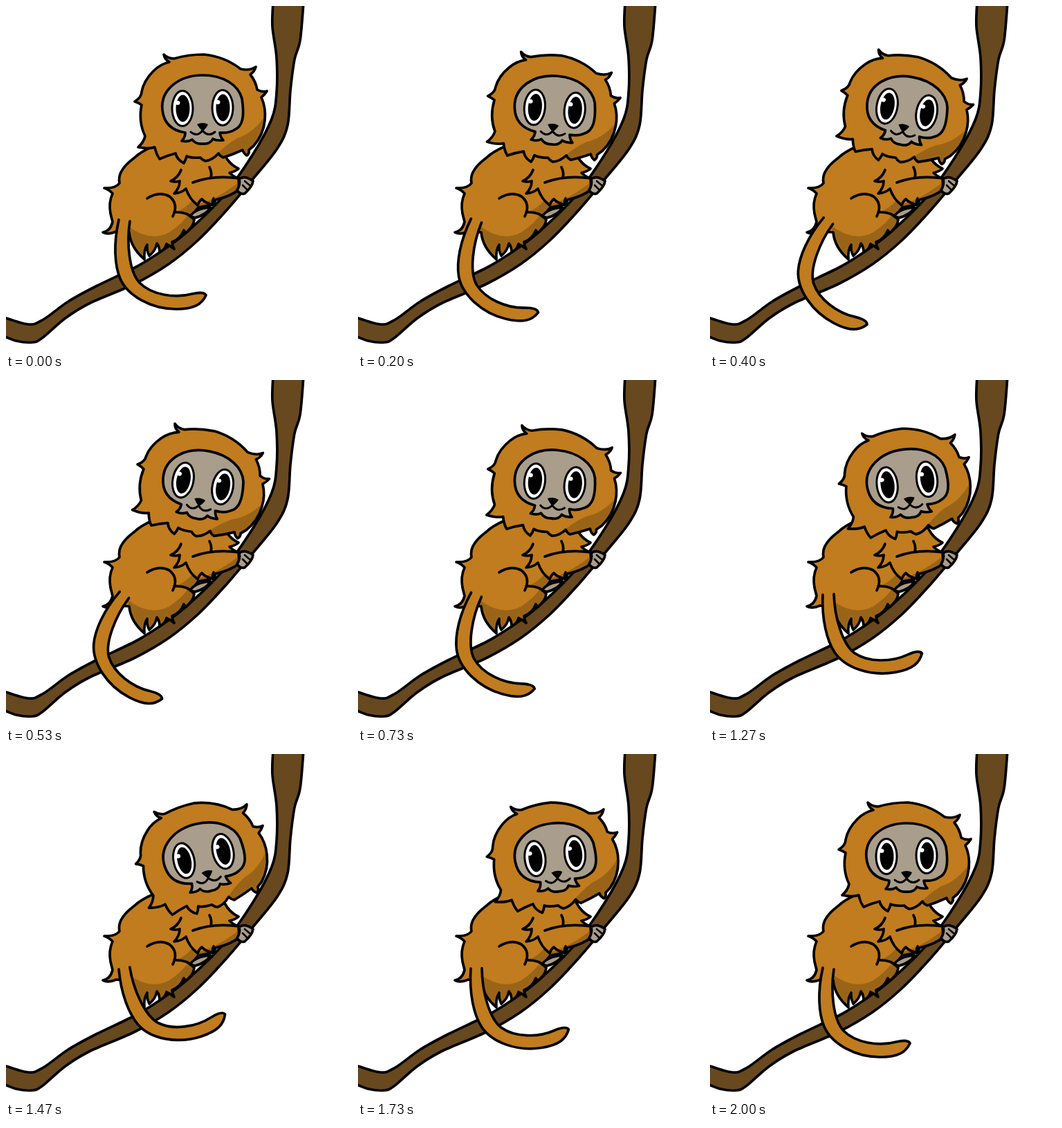
An HTML page that plays this animation: 500x500 px, repeating every 2.07 s.

```html
<!DOCTYPE html>
<html lang="en">
<head>
<meta charset="utf-8">
<title>Monkey on a branch</title>
<style>
  html, body { margin: 0; width: 100%; height: 100%; overflow: hidden; background: #fff; }
  svg { display: block; width: 100%; height: 100%; }
  .line { fill: none; stroke: #000; stroke-width: 3.7; stroke-linecap: round; stroke-linejoin: round; }
  .fur { fill: #c07c1e; }
  .shade { fill: #9a6418; }
  .skin { fill: #a99d8b; }
  .bark { fill: #68481e; }
</style>
</head>
<body>
<svg viewBox="0 0 500 500">
  <defs>
    <path id="bodyShape" d="M212 203 Q194 211 186 219 Q167 233 164 246 Q163 252 164 256
      Q158 264 142 263 Q150 266 154 271 Q148 284 151 300 Q153 308 154 312 Q151 325 140 327
      Q148 331 159 326 L178 327 Q180 349 200 366 Q199 352 204 345 Q203 353 207 361
      Q216 354 218 343 Q222 348 222 356 Q230 352 232 344 Q237 346 243 351 Q240 345 240 341
      Q252 337 257 324 Q259 326 258 329 Q271 320 272 309 Q270 305 268 303
      L278 291 L300 287 L303 280 Q325 275 337 265 L336 249 Q329 247 323 241 Q332 239 336 235
      Q327 231 320 222 L300 190 L230 190 Z"/>
    <path id="headShape" d="M228 70 Q234 76 243 76 Q263 70 286 70 Q316 73 339 91 Q352 94 361 88
      Q359 95 353 99 Q361 109 363 121 Q370 125 377 123 Q374 128 369 132 Q376 147 374 165
      Q372 186 358 202 L351 208 Q352 213 348 216 Q343 213 342 208 Q329 214 314 219
      Q309 217 307 213 Q298 223 288 224 Q283 222 281 219 Q267 220 261 217 Q260 222 257 227
      Q247 222 245 213 Q233 216 222 221 Q217 214 215 204 Q206 207 191 204 Q199 197 201 188
      Q191 167 196 143 Q192 140 186 138 Q196 132 196 124 Q199 108 213 94 Q223 84 236 81
      Q229 77 228 70 Z"/>
    <clipPath id="bodyClip"><use href="#bodyShape"/></clipPath>
    <clipPath id="headClip"><use href="#headShape"/></clipPath>
  </defs>

  <path id="branch" class="bark line" style="fill:#68481e"/>

  <g id="foot">
    <path class="line" style="fill:#a99d8b" d="M266 304 Q273 293 295 291 Q291 301 273 306 Z"/>
  </g>

  <g id="body">
    <use href="#bodyShape" class="fur"/>
    <g clip-path="url(#bodyClip)" class="shade">
      <path d="M176 318 Q208 342 236 327 Q253 316 263 302 L290 325 L240 370 L180 370 Z"/>
      <path d="M247 297 Q262 291 270 279 L280 286 Q306 279 340 252 L338 280 L300 292 L268 302 Z"/>
    </g>
    <path class="skin" d="M266 304 Q273 293 295 291 Q291 301 273 306 Z"/>
    <use href="#bodyShape" class="line"/>
    <path class="line" style="fill:#a99d8b" d="M266 304 Q273 293 295 291 Q291 301 273 306 Z"/>
    <path class="line" d="M204 278 Q221 267 236 275 Q250 286 241 304 M243 298 Q262 297 271 308"/>
    <path class="line" d="M253 237 Q249 248 238 253 Q245 255 251 253 Q251 263 243 271 Q254 270 260 264
      Q265 279 277 288 Q279 282 283 279 Q288 285 299 287 Q298 282 300 278 M270 255 Q300 244 336 249
      M294 233 Q298 241 296 248"/>
    <path class="line" style="fill:#a99d8b" d="M337 250 Q345 244 357 253 Q356 261 345 271 Q338 273 334 266 Q339 258 337 250 Z"/>
    <path class="line" style="stroke-width:2.6" d="M342 259 L348 265 M345 253 L352 259"/>
  </g>

  <g id="tail">
    <path class="fur" d="M163 309 C155 344 157 375 165 394 C176 419 210 438 246 438 C272 438 283 431 289 418
      Q286 412 269 416 C243 423 210 417 193 400 C178 384 174 343 179 311 Z"/>
    <path class="line" d="M163 309 C155 344 157 375 165 394 C176 419 210 438 246 438 C272 438 283 431 289 418
      Q286 412 269 416 C243 423 210 417 193 400 C178 384 174 343 179 311"/>
  </g>

  <g id="head">
    <use href="#headShape" class="fur"/>
    <path clip-path="url(#headClip)" class="shade" d="M380 150 Q362 182 334 191 Q315 202 297 222 L350 235 L390 200 Z"/>
    <use href="#headShape" class="line"/>
    <path class="line" style="fill:#a99d8b" d="M284 100 C314 100 336 114 341 134 C345 160 342 174 330 179
      Q322 184 309 183 Q310 190 314 194 Q304 195 299 192 Q295 200 284 199 Q274 200 269 193
      Q263 197 254 195 Q259 190 259 183 C240 180 228 170 226 150 C223 121 250 100 284 100 Z"/>
    <g id="eyes"></g>
    <path d="M276 171 Q284 167 292 171 Q290 176 284 181 Q279 176 276 171 Z"/>
    <path class="line" style="stroke-width:3" d="M267 182 Q276 190 284 180 Q292 190 302 182"/>
  </g>
</svg>
<script>
const $ = id => document.getElementById(id);

// Smooth curve through points, continuing an existing path.
function smooth(p) {
  let d = '';
  for (let i = 0; i < p.length - 1; i++) {
    const a = p[i - 1] || p[i], b = p[i], c = p[i + 1], e = p[i + 2] || c;
    d += `C${b[0] + (c[0] - a[0]) / 6} ${b[1] + (c[1] - a[1]) / 6} ` +
         `${c[0] - (e[0] - b[0]) / 6} ${c[1] - (e[1] - b[1]) / 6} ${c[0]} ${c[1]}`;
  }
  return d;
}

const upper = [[386, -6], [385, 30], [391, 75], [391, 125], [384, 163], [357, 214], [312, 277],
  [262, 326], [228, 352], [190, 376], [130, 405], [90, 427], [54, 453], [32, 460], [-6, 449]];
const lower = [[-6, 476], [15, 484], [38, 486], [52, 480], [86, 451], [122, 429], [185, 402],
  [235, 373], [278, 338], [318, 296], [356, 251], [392, 206], [407, 172], [411, 122], [417, 77],
  [425, 50], [430, -6]];
$('branch').setAttribute('d', 'M386 -6' + smooth(upper) + 'L-6 476' + smooth(lower) + 'Z');

const eye = (x, y) => `
  <ellipse cx="${x}" cy="${y}" rx="15" ry="25.5" fill="#fff" stroke="#000" stroke-width="3"/>
  <ellipse cx="${x + .5}" cy="${y}" rx="10" ry="19.5"/>
  <ellipse cx="${x - 7}" cy="${y - 8}" rx="3.5" ry="3" fill="#fff"/>`;
$('eyes').innerHTML = eye(255, 148) + eye(313, 147);

const LOOP = 2070, STEP = 200 / 3;
const keys = [[0, 0], [7, 1], [15, 0], [22, -1], [30, 0]];

function swing(n) {
  const i = Math.max(1, keys.findIndex(k => k[0] >= n));
  const [a, u] = keys[i - 1], [b, v] = keys[i];
  return u + (v - u) * (n - a) / (b - a);
}

function pose(t) {
  const s = swing(Math.min(30, Math.floor((t + 3.4) / STEP)));
  const up = Math.max(0, s);
  $('tail').setAttribute('transform', `rotate(${s * (s > 0 ? 31.5 : 18)} 170 310)`);
  $('head').setAttribute('transform', `translate(${up * 2} ${up * 2.5}) rotate(${s * 12.3} 284 141)`);
}

const start = performance.now();
function tick() {
  pose((performance.now() - start) % LOOP);
  requestAnimationFrame(tick);
}
tick();
</script>
</body>
</html>
```
